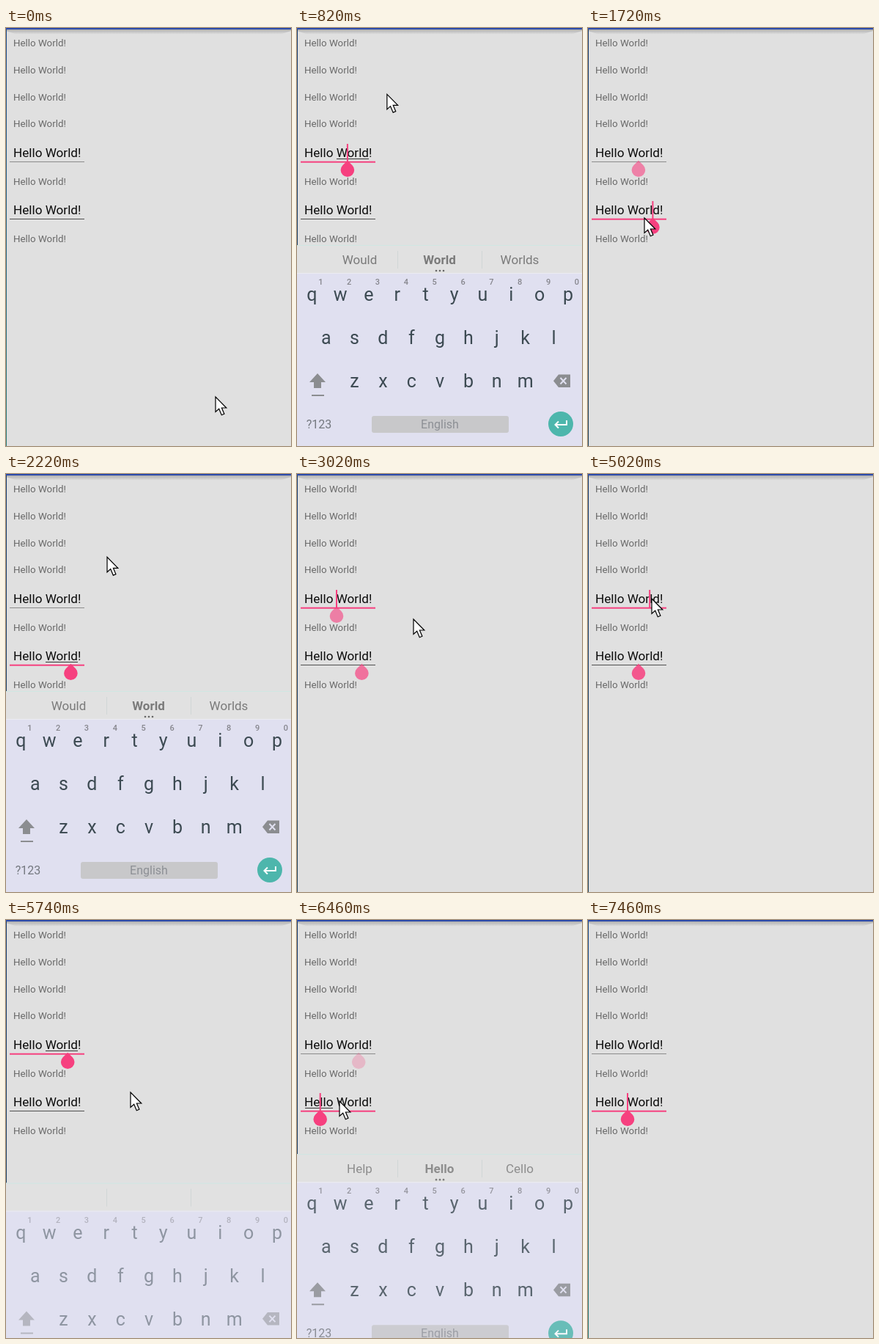
An HTML page for the animation above (7.56 s loop, 389 by 570 pixels).

```html
<!DOCTYPE html>
<html lang="en">
<head>
<meta charset="utf-8">
<title>Text fields and keyboard</title>
<style>
  html, body { margin: 0; width: 100%; height: 100%; overflow: hidden; background: #e0e0e0; }
  svg { display: block; width: 389px; height: 570px; font-family: Roboto, "Liberation Sans", sans-serif; }
  .label { font-size: 13.33px; fill: #696969; }
  .field { font-size: 17.14px; fill: #0c0c0c; }
  .pink { fill: #f6407f; }
  .mid { text-anchor: middle; }
  .key { font-size: 25px; fill: #3c4a52; }
  .hint { font-size: 11px; font-weight: 500; fill: #85858c; }
  .word { font-size: 17px; fill: #7a7a7a; }
  .low { font-size: 16px; fill: #74787f; }
  .icon { fill: #8b8d90; }
</style>
</head>
<body>
<svg id="stage" viewBox="0 0 389 570">
  <defs>
    <linearGradient id="shade" x2="0" y2="1">
      <stop offset="0" stop-color="#b0b0b0"/>
      <stop offset=".6" stop-color="#cbcbcb"/>
      <stop offset="1" stop-color="#dedede"/>
    </linearGradient>
    <linearGradient id="edgeLight" x2="0" y2="1">
      <stop offset="0" stop-color="#1d4c8c"/>
      <stop offset="1" stop-color="#2f7f78"/>
    </linearGradient>
    <linearGradient id="edgeDark" x2="0" y2="1">
      <stop offset="0" stop-color="#173c70"/>
      <stop offset="1" stop-color="#26475c"/>
    </linearGradient>
  </defs>
  <rect width="389" height="570" fill="#e0e0e0"/>
  <path d="M0 2H389V4L375 8.5H14L0 4Z" fill="url(#shade)"/>
  <rect width="389" height="2" fill="#2c4bab"/>
  <rect id="edge" y="2" width="1" height="568"/>
  <g id="texts"></g>
  <g id="board">
    <rect id="boardBack" width="389" height="280" fill="#e0e0f0"/>
    <rect id="strip" width="389" height="38" fill="#e1e1e1"/>
    <path d="M0 .5H389" stroke="#cfe6e2"/>
    <path d="M0 38.5H389" stroke="#ececf2"/>
    <path d="M137.5 8V32M252.5 8V32" stroke="#d0d6d6"/>
    <g id="words"></g>
    <g id="keys">
      <path class="icon" d="M28 175L39 187H33V195H23V187H17ZM20 204H37V206H20Z"/>
      <path class="icon" d="M357 176.500H373V194H357L350 185.250Z"/>
      <path d="M359.500 181L367.500 189.500M367.500 181L359.500 189.500" stroke="#e0e0f0" stroke-width="2"/>
      <rect x="102" y="233" width="187" height="23" rx="3" fill="#c8c8ca"/>
      <circle cx="360" cy="244" r="17" fill="#4db6ac"/>
      <path d="M368 239V245H353M357 240.500L352.500 245L357 249.500" fill="none" stroke="#fff" stroke-width="2"/>
    </g>
  </g>
  <path id="pointer" d="M0 0V20.500L4.700 16.300L8.300 24.800L11.900 23.300L8.400 15H14.800Z"
        fill="#fff" stroke="#000" stroke-width="1.2"/>
</svg>
<script>
const LOOP = 7560;
const $ = id => document.getElementById(id);
const clamp = v => Math.max(0, Math.min(1, v));

function add(parent, tag, attrs, text) {
  const el = document.createElementNS('http://www.w3.org/2000/svg', tag);
  for (const k in attrs) el.setAttribute(k, attrs[k]);
  if (text) el.textContent = text;
  return parent.appendChild(el);
}
const show = (el, alpha) => el.setAttribute('opacity', alpha);
const move = (el, x, y) => el.setAttribute('transform', `translate(${x} ${y})`);

const texts = $('texts');
for (const y of [25.2, 62, 98.7, 135.3, 213.7, 292])
  add(texts, 'text', { x: 10, y, class: 'label' }, 'Hello World!');

const fields = [[176, '#8c8c8c'], [254, '#505050']].map(([y, color]) => {
  add(texts, 'text', { x: 10, y, class: 'field' }, 'Hello World!');
  return {
    y,
    line: add(texts, 'rect', { x: 5, y: y + 6, width: 102, height: 1, fill: color }),
    active: add(texts, 'rect', { x: 5, y: y + 5.7, width: 102, height: 2, class: 'pink' }),
    under: add(texts, 'rect', { y: y + 2, height: 1, fill: '#333' }),
    caret: add(texts, 'rect', { x: -1, width: 2, height: 24, class: 'pink' }),
    handle: add(texts, 'path', { d: 'M0 -13L6.600 -6.600A9.300 9.300 0 1 1 -6.600 -6.600Z', class: 'pink' })
  };
});

// Keyboard: text, x of the first key, baseline
const keys = $('keys');
[['qwertyuiop', 20.3, 76], ['asdfghjkl', 39.7, 135], ['zxcvbnm', 78.5, 194]].forEach(([row, x0, y], r) => {
  [...row].forEach((c, i) => {
    const x = x0 + i * 38.85;
    add(keys, 'text', { x, y, class: 'key mid' }, c);
    if (!r) add(keys, 'text', { x: x + 12, y: 54, class: 'hint mid' }, String((i + 1) % 10));
  });
});
add(keys, 'text', { x: 30, y: 250, class: 'low mid' }, '?123');
add(keys, 'text', { x: 195, y: 250, class: 'low mid', opacity: .7 }, 'English');

const words = [85.5, 194.5, 304].map((x, i) =>
  add($('words'), 'text', { x, y: 26, class: 'word mid', 'font-weight': i === 1 ? 700 : 400 }));
for (const x of [190, 195, 200]) add($('words'), 'circle', { cx: x, cy: 35, r: 1.3, fill: '#666' });

// Taps: time, field, caret x, blink start
const taps = [
  [430, 0, 68.9], [1560, 1, 88.4], [2900, 0, 54], [3850, 1, 69],
  [4965, 0, 84.2], [6160, 1, 31.7], [6700, 1, 54, 6400]
];
// Keyboard: opening and closing times
const opens = [[520, 1020], [1740, 2480], [3080, 3500], [3970, 4580], [5120, 5640], [6217, 6920]];
// Pointer: time, x, y
const path = [
  [0, 286, 503], [100, 286, 503], [400, 70, 172], [550, 75, 180], [900, 130, 77], [1080, 130, 77],
  [1500, 86, 249], [1580, 85, 250], [1720, 77, 259], [1900, 90, 255], [2350, 150, 78], [2500, 150, 62],
  [2840, 56, 172], [2920, 58, 174], [3020, 159, 198], [3420, 160, 62], [3540, 160, 62],
  [3800, 70, 247], [3880, 70, 248], [4120, 89, 262], [4500, 180, 300], [4640, 180, 300],
  [4820, 120, 222], [4940, 84, 168], [5020, 87, 170], [5450, 170, 235], [5740, 170, 235],
  [6120, 33, 249], [6200, 34, 249], [6460, 58, 247], [6680, 56, 248], [6850, 150, 205],
  [6940, 150, 205], [7220, 389, 575], [LOOP, 389, 575]
];

function boardLevel(t) {
  for (const [a, b] of opens)
    if (t >= a && t < b + 200) return t < b ? clamp((t - a) / 300) : 1 - (t - b) / 200;
  return 0;
}

function drawPointer(t) {
  const i = path.findIndex(p => p[0] > t);
  const [t0, x0, y0] = path[i - 1], [t1, x1, y1] = path[i];
  const p = (t - t0) / (t1 - t0), e = p * p * (3 - 2 * p);
  move($('pointer'), x0 + (x1 - x0) * e, y0 + (y1 - y0) * e);
}

function drawFields(t, level) {
  const past = taps.filter(k => k[0] <= t);
  const now = past[past.length - 1];
  fields.forEach((f, i) => {
    const own = past.filter(k => k[1] === i), last = own[own.length - 1];
    const on = !!now && now[1] === i;
    show(f.line, on ? 0 : 1);
    show(f.active, on ? 1 : 0);
    show(f.under, on && level > .3 ? 1 : 0);
    show(f.caret, 0);
    show(f.handle, 0);
    if (!last) return;
    const x = last[2], first = x < 50;
    move(f.caret, x, f.y - 18);
    move(f.handle, x, f.y + 17.8);
    f.under.setAttribute('x', first ? 11 : 54);
    f.under.setAttribute('width', first ? 38 : 44);
    if (on) {
      const blink = (t - (last[3] || last[0])) % 1000 < 500;
      const again = past.length > 1 && past[past.length - 2][1] === i;
      show(f.caret, blink ? 1 : 0);
      show(f.handle, again ? 1 : clamp((t - last[0] - 60) / 100));
    } else {
      show(f.handle, clamp(1 - (t - now[0]) / 400));
    }
  });
  return now;
}

function drawBoard(level, tap) {
  show($('board'), level > 0 ? 1 : 0);
  move($('board'), 0, 296 + 124 * (1 - level));
  show($('boardBack'), clamp(level * 2));
  show($('strip'), clamp(level * 2));
  show(keys, level);
  show($('words'), level > .6 ? level : 0);
  const list = tap && tap[2] < 50 ? ['Help', 'Hello', 'Cello'] : ['Would', 'World', 'Worlds'];
  words.forEach((w, i) => { w.textContent = list[i]; });
}

function frame() {
  const t = performance.now() % LOOP;
  const level = boardLevel(t);
  $('edge').setAttribute('fill', t < 100 || t >= 7360 ? 'url(#edgeLight)' : 'url(#edgeDark)');
  drawBoard(level, drawFields(t, level));
  drawPointer(t);
  requestAnimationFrame(frame);
}
frame();
</script>
</body>
</html>
```
